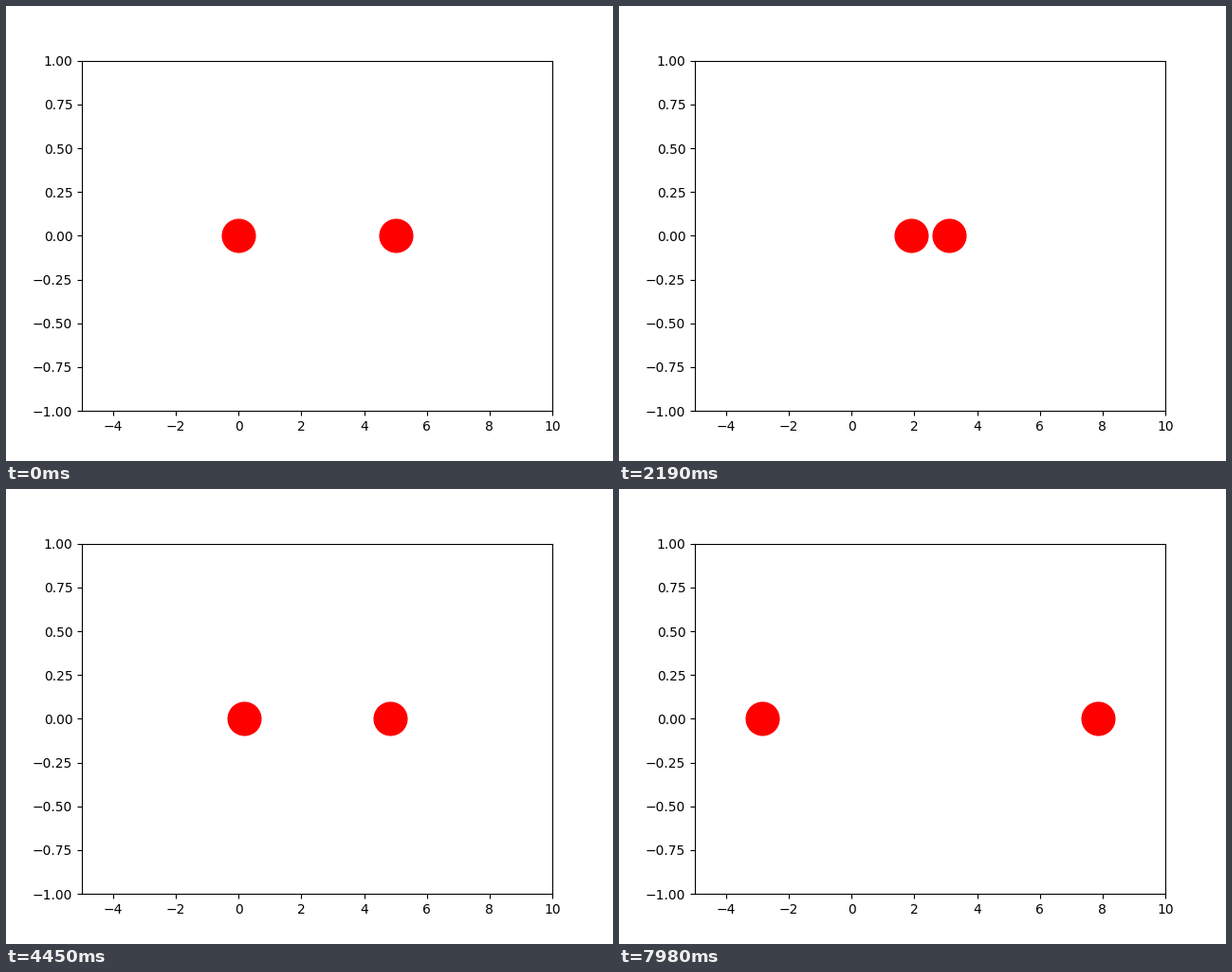
Animation, 640 px wide and 480 px high, one loop 8000 ms. Source, as a matplotlib script:

```python
from itertools import groupby
import math

import matplotlib.pyplot as plt
from matplotlib.animation import FuncAnimation

LOOP_MS = 8000
TICK_MS = 20
SPAN = 5              # starting distance between the balls
STEP = 10 / 499       # distance travelled per simulation step
BOUNCE = 100          # step at which the balls touch and turn back
STEPS = 343
UNIT_PX = 496 / 15    # horizontal pixels per data unit
ZERO_PX = 80 + 5 * UNIT_PX


def offset(step):
    """Distance of each ball from its starting point, towards the other."""
    return STEP * (BOUNCE - abs(step - BOUNCE))


def column(step):
    return math.floor(ZERO_PX + UNIT_PX * offset(step) + 0.5)


def build_timeline():
    """Steps landing on the same pixel column are held as one pose."""
    poses, start = [], 0
    for _, run in groupby(range(STEPS), key=column):
        run = list(run)
        poses.append((start, run[0]))
        start += 25 * len(run) // 10 * 10
    return poses


timeline = build_timeline()


def step_at(ms):
    return max(step for start, step in timeline if start <= ms)


fig, ax = plt.subplots(figsize=(6.4, 4.8), dpi=100)
ax.set_xlim(-5, 10)
ax.set_ylim(-1, 1)
balls, = ax.plot([0, SPAN], [0, 0], "ro", markersize=25)


def update(frame):
    x = offset(step_at(frame * TICK_MS + TICK_MS // 2))
    balls.set_data([x, SPAN - x], [0, 0])
    return balls,


anim = FuncAnimation(fig, update, frames=LOOP_MS // TICK_MS,
                     interval=TICK_MS, repeat=True, repeat_delay=0)
plt.show()
```
